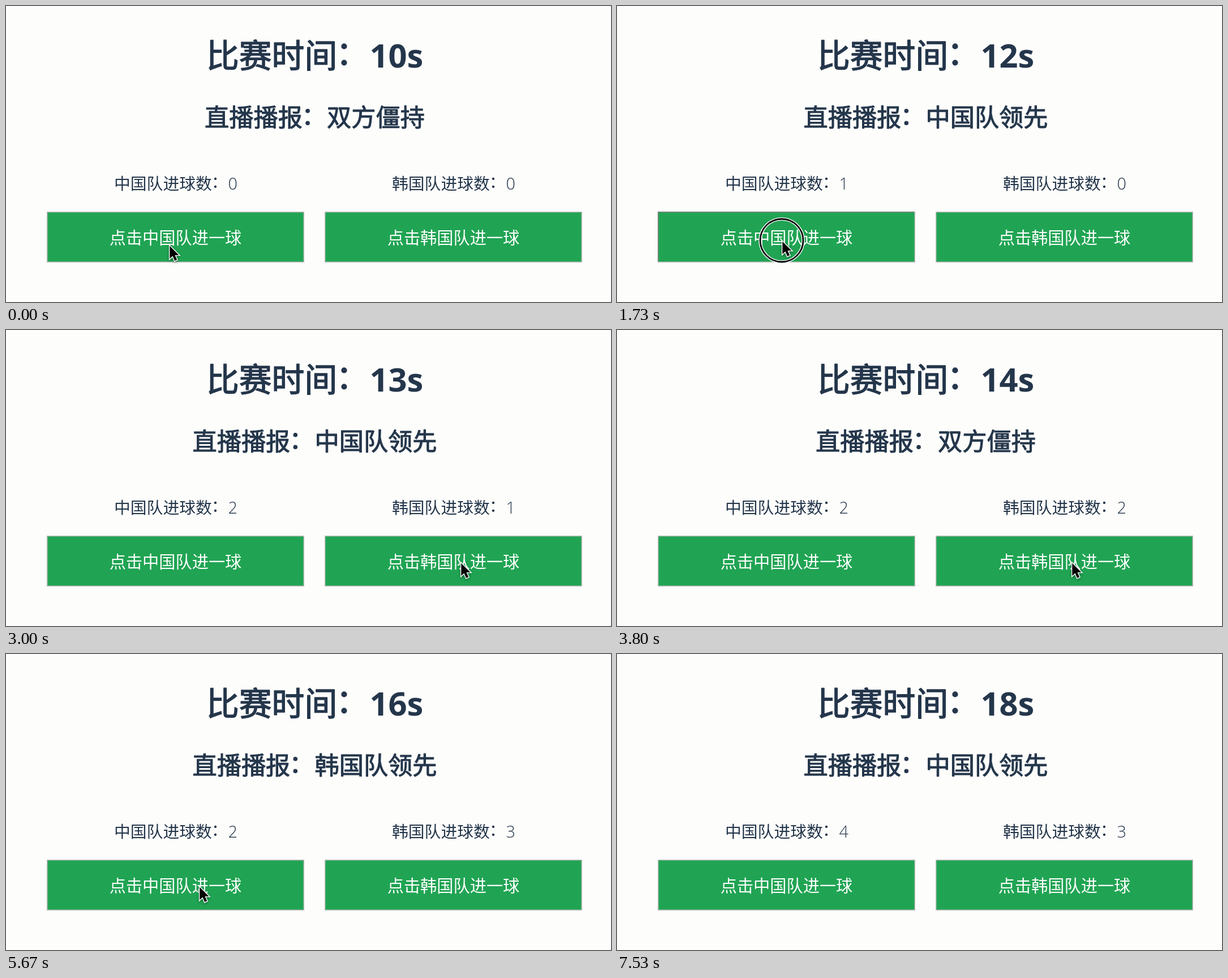
Recreate the animation shown at these times as an HTML page with a canvas. Size 1069x524 px, loop 7.59 s.

```html
<!DOCTYPE html>
<html lang="zh-CN">
<head>
<meta charset="utf-8">
<title>比赛</title>
<style>
  html, body { margin: 0; width: 100%; height: 100%; overflow: hidden; background: #fdfdfb; }
  canvas { display: block; width: 1069px; height: 524px; }
</style>
</head>
<body>
<canvas width="1069" height="524"></canvas>
<script>
const LOOP = 7590, STEP = 1000 / 15;
const INK = '#24364b', GREEN = '#20a453', PAPER = '#fdfdfb';
const CJK = '"Noto Sans CJK SC", "Noto Sans CJK", sans-serif';
const LATIN = '"Open Sans", "Noto Sans", sans-serif';
const ctx = document.querySelector('canvas').getContext('2d');

// Mouse presses: side (0 left, 1 right), down and up times
const clicks = [
  [0, 730, 860], [0, 1660, 1795],
  [1, 2640, 2780], [1, 3400, 3530], [1, 4130, 4260],
  [0, 5720, 5850], [0, 6600, 6730]
];

// Pointer tip: time, x, y
const path = [
  [0, 288, 423], [500, 291, 415], [1900, 291, 415], [2480, 803, 411],
  [4480, 803, 411], [5000, 540, 400], [5480, 341, 411],
  [6800, 341, 411], [7180, 400, 540]
];

function pointer(t) {
  const i = path.findIndex(p => p[0] > t);
  if (i < 0) return null;
  const [t0, x0, y0] = path[i - 1], [t1, x1, y1] = path[i];
  let k = (t - t0) / (t1 - t0);
  // the long leftward sweep keeps its speed through the middle point
  if (t1 === 5000) k = k * k * (2 - k);
  else if (t0 === 5000) k = 1 - (1 - k) ** 2 * (1 + k);
  else k = k * k * (3 - 2 * k);
  return [x0 + (x1 - x0) * k, y0 + (y1 - y0) * k];
}

// Full-width text, one em per character, with a raised colon
function hanzi(str, x, y, size, { color = INK, heavy = 0 } = {}) {
  ctx.font = `400 ${size}px ${CJK}`;
  ctx.fillStyle = ctx.strokeStyle = color;
  ctx.lineWidth = size * heavy;
  ctx.lineJoin = 'round';
  [...str].forEach((ch, i) => {
    const colon = ch === '：';
    const cx = x + i * size - (colon ? size * .04 : 0);
    const cy = y - (colon ? size * .07 : 0);
    ctx.fillText(ch, cx, cy);
    if (heavy) ctx.strokeText(ch, cx, cy);
  });
}

function centred(str, x, y, size, style) {
  hanzi(str, x - str.length * size / 2, y, size, style);
}

function latin(str, x, y, size, weight) {
  ctx.font = `${weight} ${size}px ${LATIN}`;
  ctx.fillStyle = INK;
  ctx.fillText(str, x, y);
}

function button(x, label, pressed) {
  const y = 364, w = 455, h = 90, edge = 1.5;
  ctx.fillStyle = '#bcbcbc';
  ctx.fillRect(x, y, w, h);
  if (pressed) {
    ctx.fillStyle = '#6c756f';
    ctx.fillRect(x, y, w - edge, edge);
    ctx.fillRect(x, y, edge, h - edge);
  }
  ctx.fillStyle = GREEN;
  ctx.fillRect(x + edge, y + edge, w - 2 * edge, h - 2 * edge);
  centred(label, x + w / 2, 420.5, 29.2, { color: '#fff' });
}

function ring(x, y) {
  ctx.beginPath();
  ctx.arc(x, y, 38, 0, Math.PI * 2);
  for (const [color, width] of [['#fff', 5.5], ['#000', 2.8]]) {
    ctx.strokeStyle = color;
    ctx.lineWidth = width;
    ctx.stroke();
  }
}

function arrow(x, y) {
  ctx.save();
  ctx.translate(x + 1.3, y + 1.8);
  ctx.scale(.92, .92);
  const shape = new Path2D('M0 0V24.5L5.6 19.3 9.6 28.6 14 26.7 10 17.5H17.5Z');
  ctx.lineJoin = 'miter';
  ctx.lineWidth = 3;
  ctx.strokeStyle = '#fff';
  ctx.shadowColor = 'rgba(0,0,0,.35)';
  ctx.shadowBlur = 4;
  ctx.shadowOffsetY = 2;
  ctx.stroke(shape);
  ctx.shadowColor = 'transparent';
  ctx.fillStyle = '#000';
  ctx.fill(shape);
  ctx.restore();
}

function draw(t) {
  const goals = [0, 0];
  let held = -1;
  for (const [side, down, up] of clicks) {
    if (t >= up) goals[side]++;
    else if (t >= down) held = side;
  }
  const teams = ['中国队', '韩国队'];
  const lead = goals[0] - goals[1];
  const report = lead ? teams[lead > 0 ? 0 : 1] + '领先' : '双方僵持';
  const seconds = 10 + Math.floor((t + 750) / 1000);

  ctx.fillStyle = PAPER;
  ctx.fillRect(0, 0, 1069, 524);
  hanzi('比赛时间：', 354, 108.5, 57.8, { heavy: .025 });
  latin(seconds + 's', 642.5, 108.5, 57.8, 700);
  centred('直播播报：' + report, 545.5, 213, 43.2, { heavy: .025 });

  teams.forEach((team, i) => {
    const x = 191 + i * 491;
    hanzi(team + '进球数：', x, 324.5, 28.8);
    latin(goals[i], x + 201.6, 324.5, 28.8, 300);
    button(72 + i * 491, `点击${team}进一球`, held === i);
  });

  const tip = pointer(t);
  if (tip) {
    if (held >= 0) ring(...tip);
    arrow(...tip);
  }
}

function tick(now) {
  const t = now % LOOP;
  draw(Math.floor((t + 4) / STEP) * STEP);
  requestAnimationFrame(tick);
}
requestAnimationFrame(tick);
</script>
</body>
</html>
```
